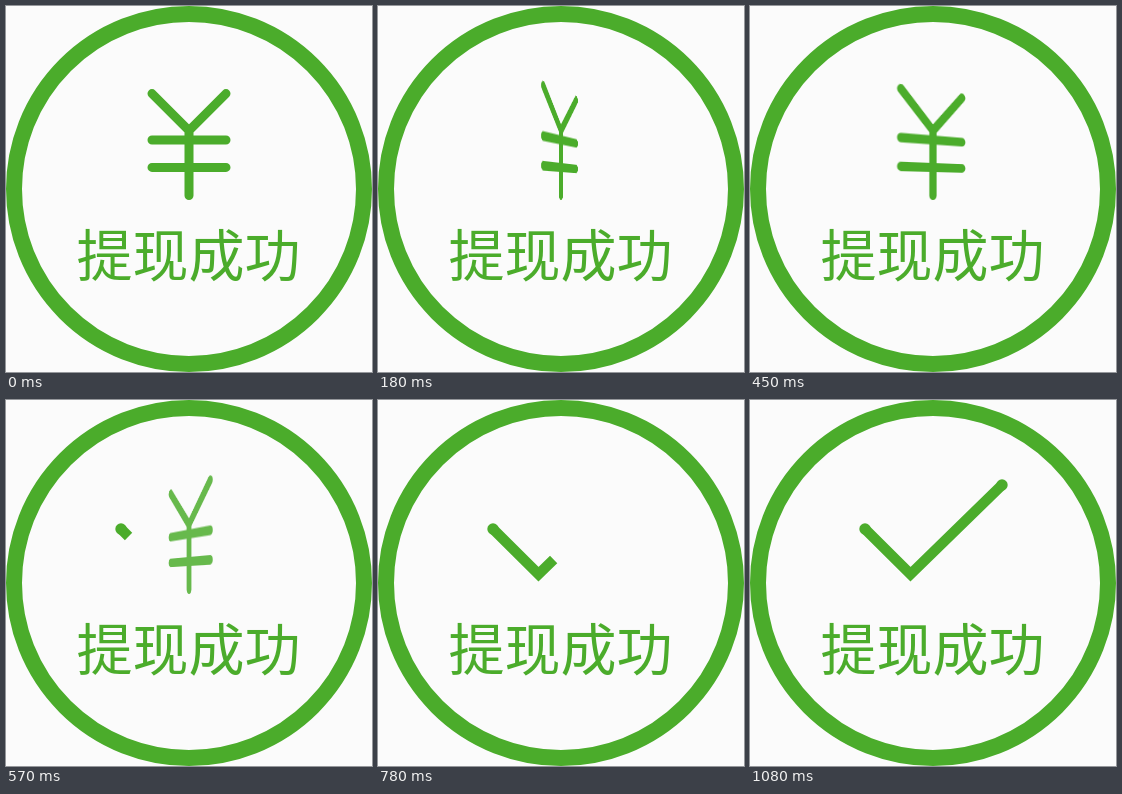
Animation, 366 px wide and 366 px high, one loop 1.35 s. Source, as an HTML page:

```html
<!DOCTYPE html>
<html lang="zh-CN">
<head>
<meta charset="utf-8">
<style>
  html, body { margin: 0; width: 100%; height: 100%; overflow: hidden; background: #fbfbfb; }
  body { position: relative; }
  svg { position: absolute; left: 0; top: 0; width: 366px; height: 366px; fill: none; stroke: #4bac2b; }
  text, circle.cap { fill: #4bac2b; stroke: none; }
  text { font: 400 56px "Noto Sans CJK SC", "Noto Sans CJK", sans-serif; text-anchor: middle; }
  #yen {
    left: 133px; top: 73px; width: 100px; height: 122px; overflow: visible;
    transform-origin: 50px 110px;
    stroke-width: 9; stroke-linecap: round; stroke-linejoin: round;
  }
</style>
</head>
<body>
<svg viewBox="0 0 366 366">
  <circle cx="183" cy="183" r="175" stroke-width="16"/>
  <text x="182.5" y="270">提现成功</text>
</svg>
<svg id="yen" viewBox="133 73 100 122">
  <path d="M146 87.6L183 124.6L220 87.6M183 124.6V189.5M146 134H220M146 161.4H220"/>
</svg>
<svg viewBox="0 0 366 366">
  <path id="tick" d="M115 129L160.5 174.3L252 85" stroke-width="10.4" pathLength="1"/>
  <circle id="head" class="cap" cx="115" cy="129" r="5.7"/>
  <circle id="tail" class="cap" cx="252" cy="85" r="5.7"/>
</svg>
<script>
  const LOOP = 1350, STEP = 30;
  const [yen, tick, head, tail] = ['yen', 'tick', 'head', 'tail'].map(id => document.getElementById(id));
  const clamp = v => Math.min(1, Math.max(0, v));
  const show = (el, on) => el.style.visibility = on ? 'visible' : 'hidden';

  function draw(time) {
    const t = Math.floor(time % LOOP / STEP) * STEP;

    // The coin sign spins at a constant rate and fades as the tick begins.
    const angle = -360 * Math.max(0, t - 30) / 465;
    yen.style.transform = `perspective(450px) rotateY(${angle}deg)`;
    yen.style.opacity = 1 - clamp((t - 540) / 200);

    const drawn = clamp((t - 540) / 540);
    tick.style.strokeDasharray = `${drawn} 2`;
    show(tick, drawn > 0);
    show(head, drawn > 0);
    show(tail, drawn === 1);
  }

  const start = performance.now();
  function frame() {
    draw(performance.now() - start);
    requestAnimationFrame(frame);
  }
  frame();
</script>
</body>
</html>
```
